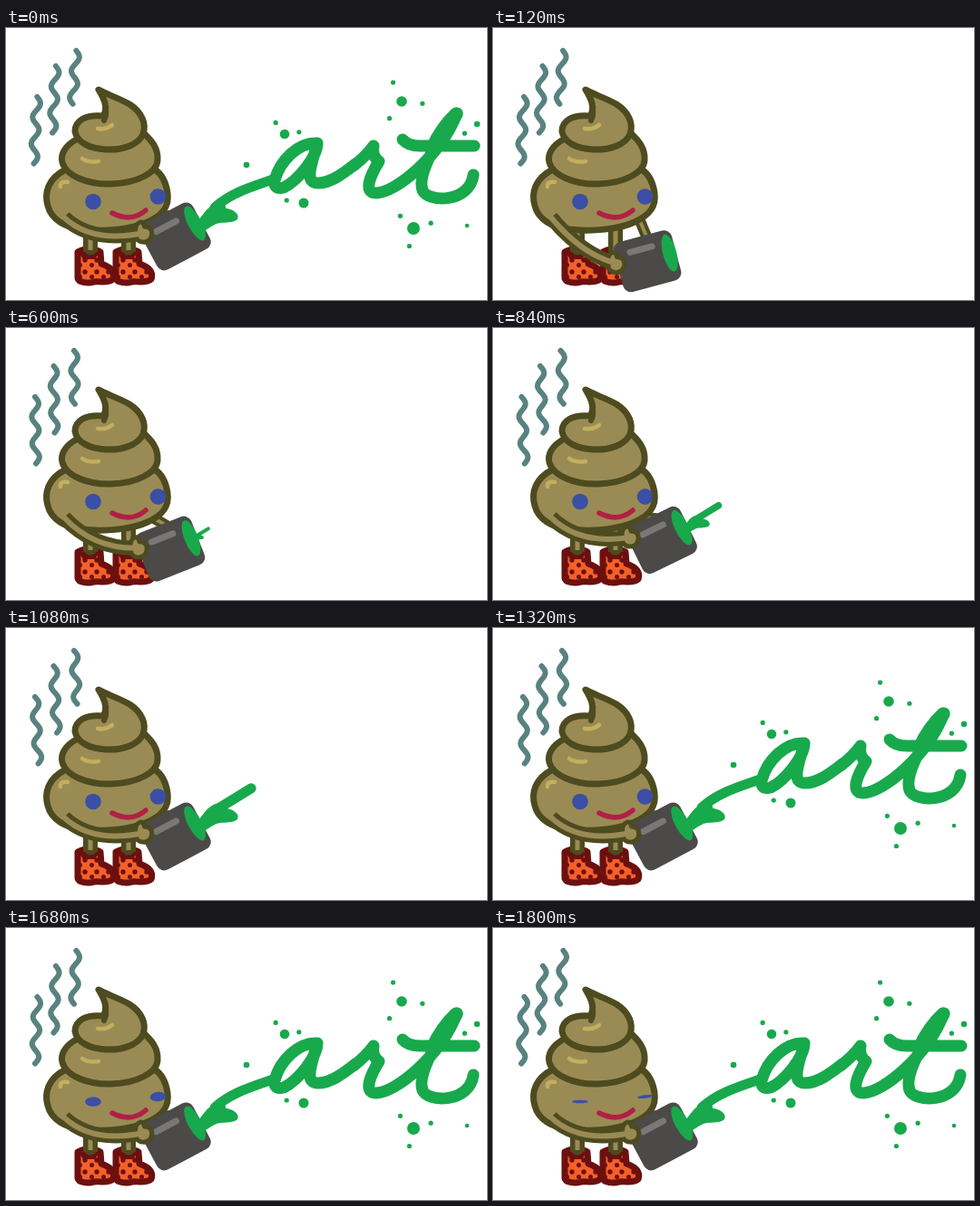
An HTML page for the animation above (1.92 s loop, 530 by 300 pixels).

```html
<!DOCTYPE html>
<html lang="en">
<head>
<meta charset="utf-8">
<title>Paint splash</title>
<style>
  html, body { margin: 0; width: 100%; height: 100%; overflow: hidden; background: #fff; }
  svg { display: block; width: 530px; height: 300px; }
  path, line { stroke-linecap: round; stroke-linejoin: round; }
  .body { fill: #9a8b55; stroke: #4d4b1f; stroke-width: 7; }
  .shine { fill: none; stroke: #c3af5d; stroke-width: 4.5; }
  .dark { fill: none; stroke: #4d4b1f; }
  .skin { fill: none; stroke: #9a8b55; }
  .butt { stroke-linecap: butt; }
  .eye { fill: #3a4fa5; }
  .steam { fill: none; stroke: #588280; stroke-width: 6; }
  .paint { fill: none; stroke: #18a94c; }
  .drop { fill: #18a94c; }
</style>
</head>
<body>
<svg viewBox="0 0 530 300">
  <defs>
    <pattern id="spots" x="78" y="252" width="13" height="13" patternUnits="userSpaceOnUse">
      <rect width="13" height="13" fill="#f4602a"/>
      <g fill="#6c100f"><circle cx="9" cy="4" r="2.7"/><circle cx="3.5" cy="9.5" r="2.5"/></g>
    </pattern>
    <g id="boot">
      <path d="M79 247 C86 243 98 243 104 247 L105 260 C114 263 121 268 118 277 C113 282 101 279 97 280 C91 282 80 281 79 276 Z" fill="url(#spots)" stroke="#6c100f" stroke-width="7"/>
      <path d="M79 246 L85 255 H98 L104 246 Z" fill="#6c100f"/>
      <path class="dark butt" d="M93 222 V247" stroke-width="16"/>
      <path class="skin" d="M93 222 V246" stroke-width="5"/>
      <path d="M85 245 Q93 256 101 245 Z" fill="#4d4b1f"/>
    </g>
  </defs>

  <g id="steam"></g>
  <use href="#boot"/>
  <use href="#boot" x="42"/>

  <path id="farEdge" class="dark" stroke-width="12"/>
  <path id="farSkin" class="skin" stroke-width="4"/>

  <path class="body" d="M66 156 C46 166 42 182 46 196 C50 212 66 220 84 222 C108 225 140 222 156 214 C174 206 180 196 178 182 C176 168 170 160 164 156 Z"/>
  <path class="body" d="M79 122 C64 130 60 140 62 148 C66 163 90 173 116 172 C146 171 166 159 167 146 C168 132 160 124 152 116 Z"/>
  <path class="body" d="M102 68 C108 72 126 78 136 84 C150 93 155 106 151 117 C146 129 128 135 110 134 C92 133 78 126 76 114 C76 102 88 95 107 97 C113 88 108 78 102 68 Z"/>
  <path class="dark" stroke-width="6" d="M110 90 Q111 97 108 102"/>
  <path class="shine" d="M101 111 Q111 112 117 107 M84 144 Q91 149 102 147 M60 175 Q59 169 68 170"/>
  <ellipse id="eyeL" class="eye" cx="96" cy="191.5" rx="8.8"/>
  <ellipse id="eyeR" class="eye" cx="167.5" cy="186" rx="8.8" transform="rotate(-6 167.5 186)"/>
  <path fill="none" stroke="#b11f45" stroke-width="5.5" d="M117 204 Q138 215 154 201"/>

  <g id="can">
    <rect x="-34" y="-28" width="66" height="57" rx="9" fill="#4c4a48"/>
    <line x1="-17" y1="-14" x2="8" y2="-14" stroke="#7a7876" stroke-width="7"/>
    <ellipse class="drop" cx="25" cy="-2" rx="7.5" ry="21"/>
  </g>

  <path id="armEdge" class="dark butt" stroke-width="16"/>
  <path id="fist" class="body" style="stroke-width:5" d="M-9 -3 C-8 -13 0 -15 1 -7 C9 -7 11 0 8 6 C4 12 -5 11 -8 6 Z"/>
  <path id="armSkin" class="skin" stroke-width="6"/>

  <path id="lobe" class="drop" d="M-4 -6 C4 0 8 -14 16 -20 C24 -26 34 -26 34 -19 C42 -18 51 -12 46 -6 C40 -2 30 -4 24 -2 C16 2 10 6 4 12 Z"/>
  <path id="jet" class="paint"/>

  <g id="first" class="paint" stroke-width="13">
    <path stroke-width="11" d="M230 198 C248 182 268 176 294 167"/>
    <path d="M296 168 C302 146 322 126 343 127 C343 142 322 168 306 176 C296 178 294 172 297 165 M343 127 C338 148 327 171 344 171 C358 171 372 160 385 150"/>
  </g>
  <g id="rest" class="paint" stroke-width="13">
    <path d="M383 152 Q397 141 405 130 Q403 142 411 147 C403 160 392 182 408 182 C430 181 478 142 497 94 C482 112 452 160 459 179 C465 193 511 193 515 162 M437 123 Q443 130 456 130 H516"/>
    <path stroke-width="15" d="M496 95 Q480 110 470 132"/>
  </g>
  <g id="near" class="drop"></g>
  <g id="far" class="drop"></g>
</svg>
<script>
  const STEP = 120, COUNT = 16, RISE = 9, TAU = Math.PI * 2;
  const $ = id => document.getElementById(id);
  const clamp = v => Math.min(1, Math.max(0, v));
  const set = (id, attrs) => {
    for (const name in attrs) $(id).setAttribute(name, attrs[name]);
  };
  const show = (on, ...ids) => ids.forEach(id => set(id, { visibility: on ? 'visible' : 'hidden' }));

  // one big drop with small ones spread evenly around it
  function splat(x, y, r, count, turn, gap) {
    let dots = `<circle cx="${x}" cy="${y}" r="${r}"/>`;
    for (let i = 0; i < count; i++) {
      const a = turn + i * TAU / 3;
      dots += `<circle cx="${x + gap * Math.cos(a)}" cy="${y + gap * Math.sin(a)}" r="2.6"/>`;
    }
    return dots;
  }
  $('near').innerHTML = splat(307, 117, 5.3, 2, 4.05, 16) + splat(328, 193, 5.5, 1, 3.3, 19)
    + splat(265, 151, 3.3, 0);
  $('far').innerHTML = splat(436, 81, 5.8, 3, .1, 23) + splat(449, 221, 7, 3, 1.8, 20)
    + splat(519, 106, 3.3, 1, 2.5, 17) + splat(508, 218, 2.3, 0);

  function drawSteam(k) {
    const top = 1.5 * Math.cos((k + 1) * TAU / COUNT);
    const end = -2.6 * Math.cos((k - 1) * TAU / COUNT);
    const wisp = (x, y, bends) => {
      let d = '';
      for (let i = 0; i <= bends * 6; i++) {
        const u = i / bends / 6;
        const px = x + top + (end - top) * u + 4 * Math.sin(i / 6 * Math.PI);
        d += `${i ? 'L' : 'M'}${px} ${y + i * 2.45}`;
      }
      return `<path class="steam" d="${d}"/>`;
    };
    $('steam').innerHTML = wisp(33, 76, 5) + wisp(53.5, 42, 5) + wisp(76, 25, 4);
  }

  function drawCan(k) {
    const p = k ? clamp((k - 1) / (RISE - 1)) : 1;
    const up = (1 - Math.cos(Math.PI * p)) / 2;
    const x = 171 + 16 * up + 2.5 * Math.sin(Math.PI * p), y = 256.5 - 27.5 * up;
    const angle = -15 - 13 * up, a = angle * Math.PI / 180;
    set('can', { transform: `translate(${x} ${y}) rotate(${angle})` });

    const hx = x - 35.5, hy = y + 3 - 6 * up;
    const arm = `M64 209 Q${98 - 3 * up} ${250 - 12 * up} ${hx} ${hy}`;
    const far = `M160 208 L${x} ${y - 22}`;
    set('armEdge', { d: arm });
    set('armSkin', { d: arm });
    set('fist', { transform: `translate(${hx} ${hy})` });
    set('farEdge', { d: far });
    set('farSkin', { d: far });
    return [x + 24 * Math.cos(a), y + 24 * Math.sin(a)];
  }

  function drawPaint(k, [mx, my]) {
    const splashed = k === 0 || k > RISE;
    const grow = splashed ? 1 : clamp((k - 5) / (RISE - 5));
    const dx = 19 + 43 * grow, dy = -.66 * dx;
    show(!splashed && k > 1, 'jet');
    show(splashed || k > 1, 'lobe');
    show(splashed, 'first', 'near');
    show(splashed && k !== RISE + 1, 'rest', 'far');
    set('lobe', { transform: `translate(${mx} ${my}) scale(${.3 + .7 * grow})` });
    set('jet', {
      d: `M${mx + dx * .3} ${my + dy * .35}L${mx + dx} ${my + dy}`,
      'stroke-width': 4 + 7 * grow
    });
  }

  function draw(k) {
    drawSteam(k);
    drawPaint(k, drawCan(k));
    const ry = 8.8 * (1 - .4 * Math.max(0, k - 13));
    set('eyeL', { ry });
    set('eyeR', { ry });
  }

  let last = -1;
  const start = performance.now();
  function tick() {
    const k = Math.floor((performance.now() - start) / STEP) % COUNT;
    if (k !== last) draw(last = k);
    requestAnimationFrame(tick);
  }
  tick();
</script>
</body>
</html>
```
